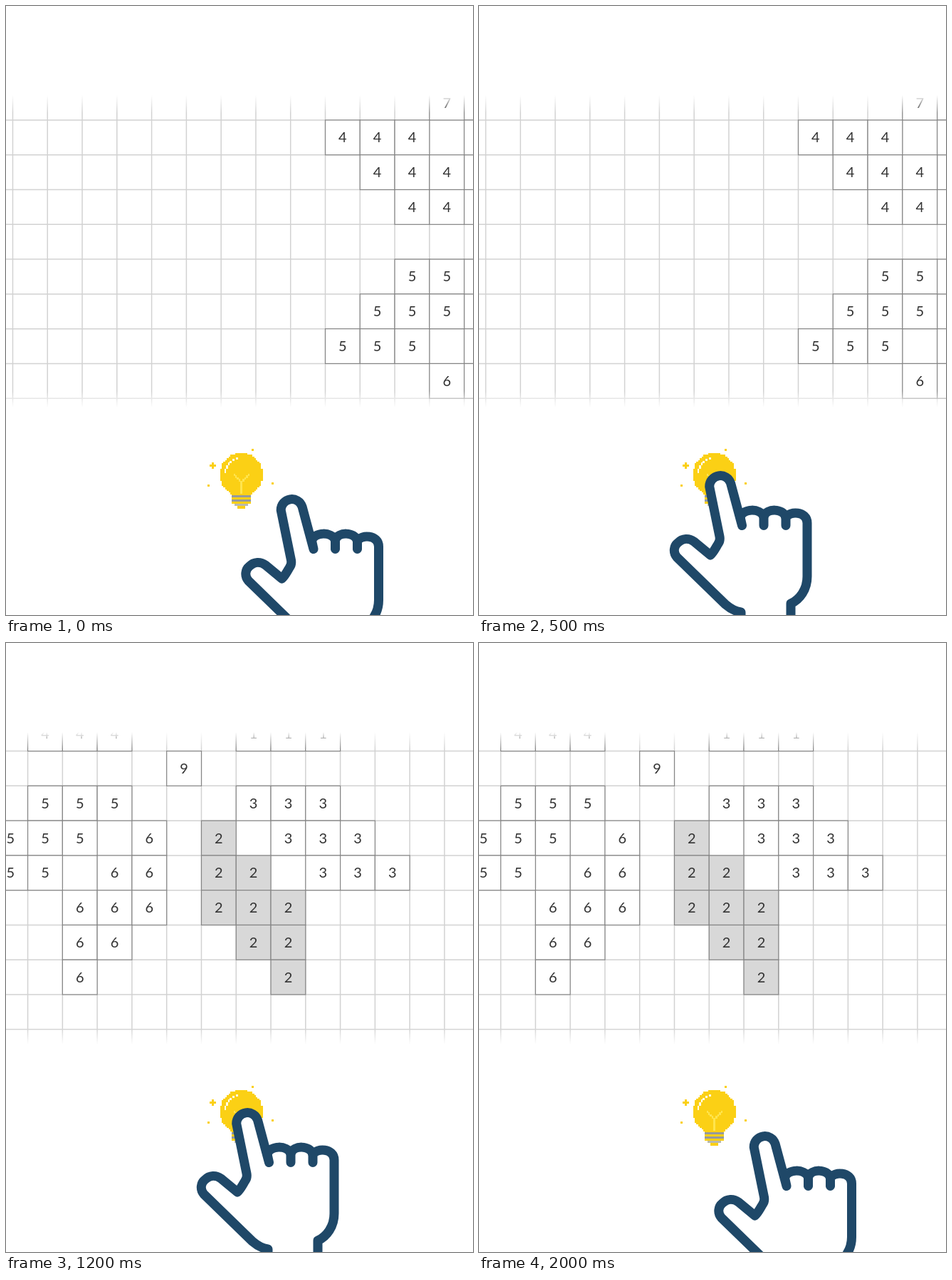
Recreate the animation shown at these times as an HTML page. Size 656 by 854 pixels, loop 2400 ms.

```html
<!DOCTYPE html>
<html lang="en">
<head>
<meta charset="utf-8">
<title>Number grid hint</title>
<style>
html, body { margin: 0; width: 100%; height: 100%; overflow: hidden; background: #fff; }
svg { display: block; width: 100vw; height: 100vh; }
text { font: 20px Lato, "Open Sans", sans-serif; fill: #333; text-anchor: middle; }
</style>
</head>
<body>
<svg viewBox="0 0 656 854">
  <defs>
    <linearGradient id="top" x2="0" y2="1">
      <stop offset="0" stop-color="#fff"/>
      <stop offset="1" stop-color="#fff" stop-opacity="0"/>
    </linearGradient>
    <linearGradient id="bottom" x2="0" y2="1">
      <stop offset="0" stop-color="#fff" stop-opacity="0"/>
      <stop offset="1" stop-color="#fff"/>
    </linearGradient>
  </defs>
  <g id="boards"></g>
  <rect width="656" height="125" fill="#fff"/>
  <rect y="125" width="656" height="25" fill="url(#top)"/>
  <rect y="540" width="656" height="23" fill="url(#bottom)"/>
  <rect y="563" width="656" height="291" fill="#fff"/>
  <g id="bulb" shape-rendering="crispEdges"></g>
  <circle id="ring" cx="331" cy="660.5" r="58.5" fill="none" stroke="#d3d9df" stroke-width="5"/>
  <g id="hand" fill="#fff" stroke="#1f4868" stroke-width="13" stroke-linecap="round" stroke-linejoin="round">
    <path id="outline"/>
    <path d="M400 716V728.5M431 717V728.5" fill="none"/>
  </g>
</svg>
<script>
const NS = "http://www.w3.org/2000/svg";
const $ = id => document.getElementById(id);
const CELL = 48.78;

function add(parent, tag, attrs, text) {
  const el = document.createElementNS(NS, tag);
  for (const k in attrs) el.setAttribute(k, attrs[k]);
  if (text) el.textContent = text;
  return parent.appendChild(el);
}

// Each row is a string of "column:digits" groups.
function board(x0, y0, rows) {
  const g = add($("boards"), "g", {});
  let d = "";
  for (let i = 0; i < 15; i++) d += `M${x0 + i * CELL} 120V565`;
  for (let i = 0; i < 10; i++) d += `M0 ${y0 + i * CELL}H656`;
  add(g, "path", { d, stroke: "#d2d2d2", "stroke-width": 1.5 });
  rows.forEach((row, r) => {
    for (const group of row.split(" ").filter(Boolean)) {
      const [col, digits] = group.split(":");
      [...digits].forEach((n, i) => {
        const x = x0 + (+col + i) * CELL, y = y0 + r * CELL;
        add(g, "rect", {
          x, y, width: CELL, height: CELL, "stroke-width": 1.2,
          stroke: "#858585", fill: n === "2" ? "#d8d8d8" : "#fff"
        });
        add(g, "text", { x: x + CELL / 2, y: y + CELL / 2 + 7 }, n);
      });
    }
  });
  return g;
}

function drawBulb() {
  const box = (x, y, width, height, fill) => add($("bulb"), "rect", { x, y, width, height, fill });
  const mid = 330.5, px = 2.4, gold = "#fbd015", light = "#ffe44d", grey = "#969a9b";
  for (let i = 0; i < 25; i++) {
    const dy = (i - 12) * px;
    const half = (Math.round(Math.sqrt(30.2 ** 2 - dy * dy) / px - 0.5) + 0.5) * px;
    box(mid - half, 657 + dy - px / 2, half * 2, px + 0.1, gold);
  }
  box(317, 685, 27, 13, gold);
  box(317, 686, 27, 3, grey);
  box(317, 692, 27, 3, grey);
  box(321, 698, 19, 3, "#b9b9ae");
  box(325, 701, 11, 3.5, gold);
  for (let i = 0; i < 5; i++) {
    box(319.5 + i * px, 656 + i * px, px, px + 1, light);
    box(339.5 - i * px, 656 + i * px, px, px + 1, light);
  }
  box(329.3, 667, px, 17, light);
  // shine along the upper left
  for (const [x, y, w, h] of [[307, 649, 2.4, 6], [309.4, 644, 2.4, 5], [311.8, 640, 2.4, 4], [314.2, 637.5, 3, 3], [318, 635, 3, 3], [323, 633, 3, 2.5]])
    box(x, y, w, h, "#fffbe6");
  box(285.5, 642.5, 9, 3, gold);
  box(288.5, 639.5, 3, 9, gold);
  box(344.5, 620.5, 3, 3, gold);
  box(282.5, 671, 3, 3, gold);
  box(372.5, 667.5, 3.5, 3.5, gold);
}

function outline(tip) {
  return "M368 862V850C360 849 353 845 346 839L278 773C272 766 274 757 279 753C286 746 295 746 302 751" +
    "L325 770C329 767 333 759 336 754Q339 750 338 744L" + tip +
    "L369.5 728.5L367 717C371 704 395 704 400 716C404 704 427 704 431 717" +
    "C436 708 461 708 461 725V800C461 818 451 832 438 838V862";
}

const before = board(-39.3, 111.2, [
  "13:77", "10:444 14:7", "11:444", "12:444", "", "12:555", "11:555", "10:555 14:6", "13:66"
]);
const after = board(-18.2, 102.8, [
  "1:444 7:111", "5:9", "1:555 7:333", "0:555 4:6 6:2 8:333", "0:55 3:66 6:22 9:333",
  "2:666 6:222", "2:66 7:22", "2:6 8:2"
]);
drawBulb();

const RAISED = outline("323.7 674A15.3 15.3 0 0 1 353.5 669");
const PRESSED = outline("325 683A16 14.5 -10 0 1 356.5 678");
const show = (el, on) => el.setAttribute("visibility", on ? "visible" : "hidden");

function render(t) {
  const touching = t >= 500 && t < 1400;
  const pressed = t >= 700 && t < 1200;
  show(before, t < 1200);
  show(after, t >= 1200);
  show($("ring"), pressed);
  $("outline").setAttribute("d", pressed ? PRESSED : RAISED);
  $("hand").setAttribute("transform", touching ? "" : "translate(62.5 33)");
}

const start = performance.now();
function tick(now) {
  render(Math.max(0, now - start) % 2400);
  requestAnimationFrame(tick);
}
render(0);
requestAnimationFrame(tick);
</script>
</body>
</html>
```
